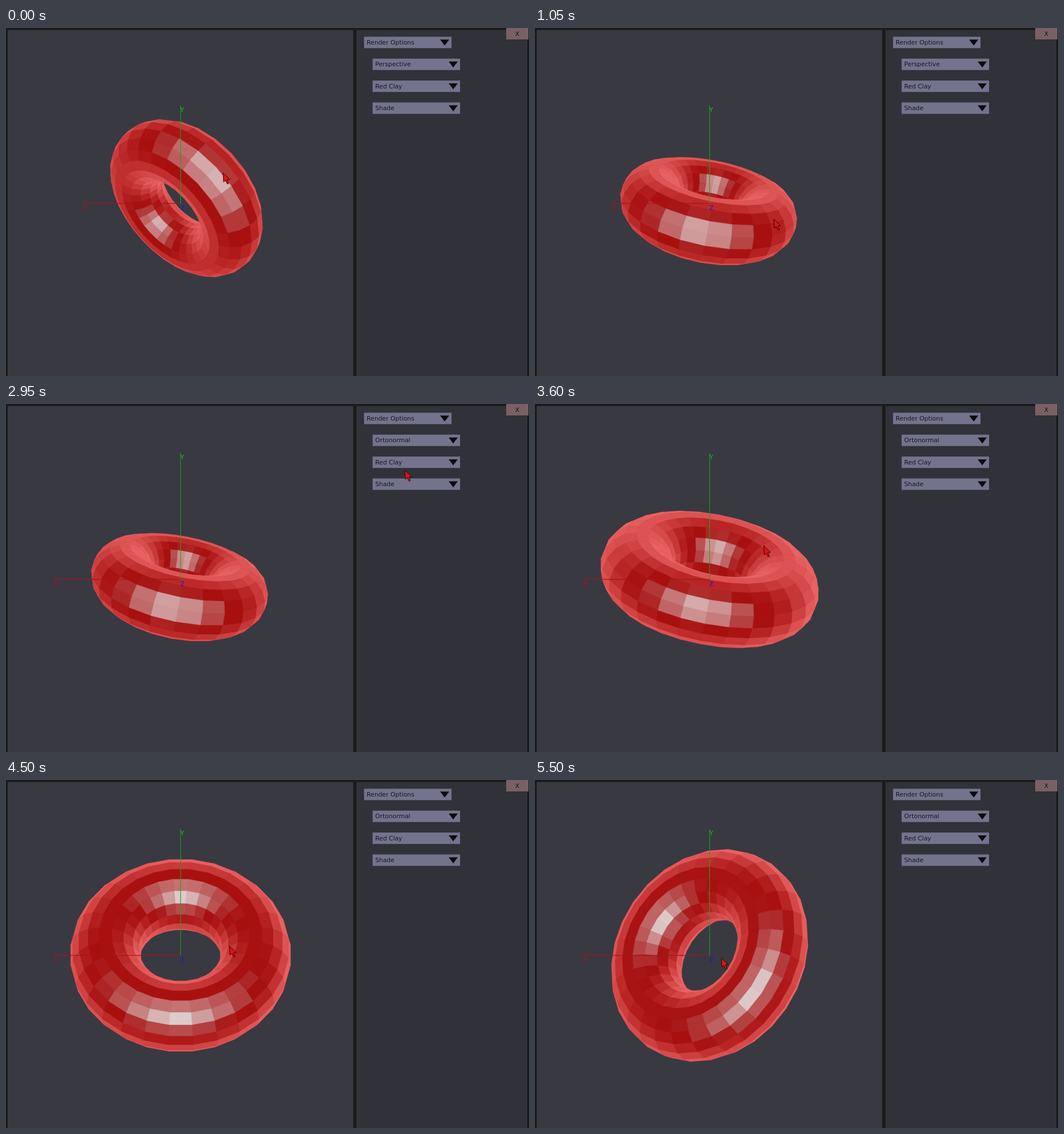
Recreate the animation shown at these times as an HTML page. Size 918x610 px, loop 5550 ms.

```html
<!DOCTYPE html>
<html lang="en">
<head>
<meta charset="utf-8">
<title>Torus viewer</title>
<style>
  html, body { margin: 0; width: 100%; height: 100%; overflow: hidden; background: #1a1a1a; }
  svg { display: block; width: 918px; height: 610px; }
  text { font: 10.8px "DejaVu Sans", Verdana, sans-serif; fill: #17171d; }
  .box { fill: #73738c; }
  .arrow { fill: #0b0b0e; }
</style>
</head>
<body>
<svg viewBox="0 0 918 610">
  <rect width="918" height="610" fill="#1a1a1a"/>
  <rect x="3" y="3.5" width="606.5" height="607" fill="#393941"/>
  <rect x="615" y="3.5" width="300" height="607" fill="#313139"/>
  <rect x="878" width="39" height="20" fill="#7a6064"/>
  <text x="897.5" y="14" text-anchor="middle">X</text>
  <g id="torus" stroke-width=".6" stroke-linejoin="round"></g>
  <g stroke-opacity=".85" stroke-width="1.3">
    <path id="xLine" stroke="#a81414"/>
    <path id="yLine" stroke="#1ca51c"/>
  </g>
  <text id="xLabel" y="318.5" style="fill:#b01414">X</text>
  <text id="yLabel" x="306" style="fill:#1cc41c">Y</text>
  <text x="306" y="318.5" style="fill:#1a1ad0">Z</text>
  <g id="menu"></g>
  <g id="list">
    <rect class="box" x="643.5" y="73.5" width="153.5" height="39"/>
    <text x="648" y="87">Perspective</text>
    <text x="648" y="106">Ortonormal</text>
  </g>
  <path id="cursor" d="M0 0L1 16L4.2 13L7.5 19.5L9.8 18.4L7.2 12.2L12 11.5Z"
        fill="#e01212" stroke="#2a0606"/>
</svg>
<script>
const LOOP = 5550, STEP = 50;
const LIST_OPEN = 1700, AXES_ORTHO = 2500, TORUS_ORTHO = 3550;
const CX = 306.5, CY = 307.5;
const RING = 132, TUBE = 62, RING_SEGS = 28, TUBE_SEGS = 18;
const PERSP_SCALE = 0.785, CAMERA = 600;

const $ = id => document.getElementById(id);
const rad = deg => deg * Math.PI / 180;
const clamp = v => Math.max(0, Math.min(1, v));
const span = (t, from, to) => clamp((t - from) / (to - from));
const easeOut = (u, power) => 1 - (1 - u) ** power;
const dot = (a, b) => a[0] * b[0] + a[1] * b[1] + a[2] * b[2];
const mix = (a, s, b, q) => a.map((v, k) => v * s + b[k] * q);

function cross(a, b) {
  return [a[1] * b[2] - a[2] * b[1], a[2] * b[0] - a[0] * b[2], a[0] * b[1] - a[1] * b[0]];
}

function make(tag, parent, attrs) {
  const el = document.createElementNS("http://www.w3.org/2000/svg", tag);
  for (const name in attrs) el.setAttribute(name, attrs[name]);
  return parent.appendChild(el);
}

function addDropdown(row, label) {
  const x = row ? 643.5 : 628.5;
  const y = 15.3 + 38.4 * row;
  make("rect", $("menu"), { class: "box", x, y, width: 153.5, height: 20 });
  make("path", $("menu"), {
    class: "arrow", d: "M133.5 5H149.5L141.5 15.5Z", transform: `translate(${x} ${y})`
  });
  const text = make("text", $("menu"), { x: x + 4.5, y: Math.floor(y + 14) });
  text.textContent = label;
  return text;
}

const [, projection] = ["Render Options", "Perspective", "Red Clay", "Shade"]
  .map((label, row) => addDropdown(row, label));
const faces = Array.from({ length: RING_SEGS * TUBE_SEGS }, () => make("polygon", $("torus"), {}));

// Pale highlight falling to dark red, then a salmon rim.
function clayColor(normal) {
  const d = clamp(Math.hypot(normal[0] + .03, normal[1] + .02));
  const rim = span(d, .58, 1) ** 1.5;
  const red = Math.max(168, 228 - 110 * d) + 66 * rim;
  const rest = Math.max(16, 225 - 380 * d) + 82 * rim;
  return `rgb(${Math.round(red)},${Math.round(rest)},${Math.round(rest)})`;
}

// The torus axis (right, up, towards the viewer) as turned by three drags.
function torusFrame(t) {
  const first = span(t, 0, 1050);
  const side = .616 - .431 * first ** 1.2
    - .185 * span(t, 3550, 4500) ** 2 - .541 * span(t, 4900, 5500);
  const pitch = rad(-44.8 + 67.1 * easeOut(first, 1.33) + 43.7 * span(t, 3550, 4850));
  const rest = Math.sqrt(1 - side * side);
  const axis = [side, rest * Math.cos(pitch), rest * Math.sin(pitch)];
  const e1 = [rest, -side * Math.cos(pitch), -side * Math.sin(pitch)];
  return { axis, e1, e2: cross(axis, e1), spin: 21 * side * (1 - side * side / 2) };
}

function drawTorus(t) {
  const { axis, e1, e2, spin } = torusFrame(t);
  const ortho = t >= TORUS_ORTHO;
  const size = ortho ? 1 : PERSP_SCALE;

  const surface = (i, j) => {
    const u = rad((i + .5) * 360 / RING_SEGS + spin);
    const v = rad(j * 360 / TUBE_SEGS);
    const radial = mix(e1, Math.cos(u), e2, Math.sin(u));
    const normal = mix(radial, Math.cos(v), axis, Math.sin(v));
    return { normal, point: mix(radial, size * RING, normal, size * TUBE) };
  };
  const project = ([i, j]) => {
    const [x, y, z] = surface(i, j).point;
    const s = ortho ? 1 : CAMERA / (CAMERA - z);
    return (CX + x * s).toFixed(1) + "," + (CY - y * s).toFixed(1);
  };

  const visible = [];
  for (let i = 0; i < RING_SEGS; i++) {
    for (let j = 0; j < TUBE_SEGS; j++) {
      const { normal, point } = surface(i + .5, j + .5);
      const view = ortho ? [0, 0, 1] : [-point[0], -point[1], CAMERA - point[2]];
      if (dot(normal, view) <= 0) continue;
      visible.push({
        depth: point[2],
        color: clayColor(normal),
        points: [[i, j], [i + 1, j], [i + 1, j + 1], [i, j + 1]].map(project).join(" ")
      });
    }
  }
  visible.sort((a, b) => a.depth - b.depth);
  faces.forEach((el, n) => {
    const face = visible[n];
    el.setAttribute("points", face ? face.points : "");
    if (!face) return;
    el.setAttribute("fill", face.color);
    el.setAttribute("stroke", face.color);
  });
}

function cursorPosition(t) {
  const first = span(t, 0, 1050);
  let x = 381 + 38 * first ** 3;
  let y = 254 + 81 * easeOut(first, 1.7);
  const move = (from, to, dx, dy) => {
    const u = span(t, from, to);
    x += dx * u;
    y += dy * u;
  };
  move(1050, 1350, 297, -273);  // to the menu
  move(1800, 2950, -16, 54);    // down the list
  move(2950, 3000, -106, 23);   // back to the torus
  move(3000, 3550, -192, 107);
  move(3550, 4900, -14, 64);    // drag down
  move(4900, 5500, -61, 2);     // drag left
  return [x, y];
}

function drawInterface(t) {
  const ortho = t >= AXES_ORTHO;
  const length = ortho ? 222 : 171.5;
  $("xLine").setAttribute("d", `M${CX} ${CY}H${CX - length}`);
  $("yLine").setAttribute("d", `M${CX} ${CY}V${CY - length}`);
  $("xLabel").setAttribute("x", CX - length - .5);
  $("yLabel").setAttribute("y", CY - length + 11);
  projection.textContent = ortho ? "Ortonormal" : "Perspective";
  $("list").style.display = t >= LIST_OPEN && !ortho ? "" : "none";
  $("cursor").setAttribute("transform", `translate(${cursorPosition(t)})`);
}

let shown = -1;
const start = performance.now();
function tick() {
  const t = Math.floor(((performance.now() - start) % LOOP) / STEP) * STEP;
  if (t !== shown) {
    shown = t;
    drawTorus(t);
    drawInterface(t);
  }
  requestAnimationFrame(tick);
}
tick();
</script>
</body>
</html>
```
